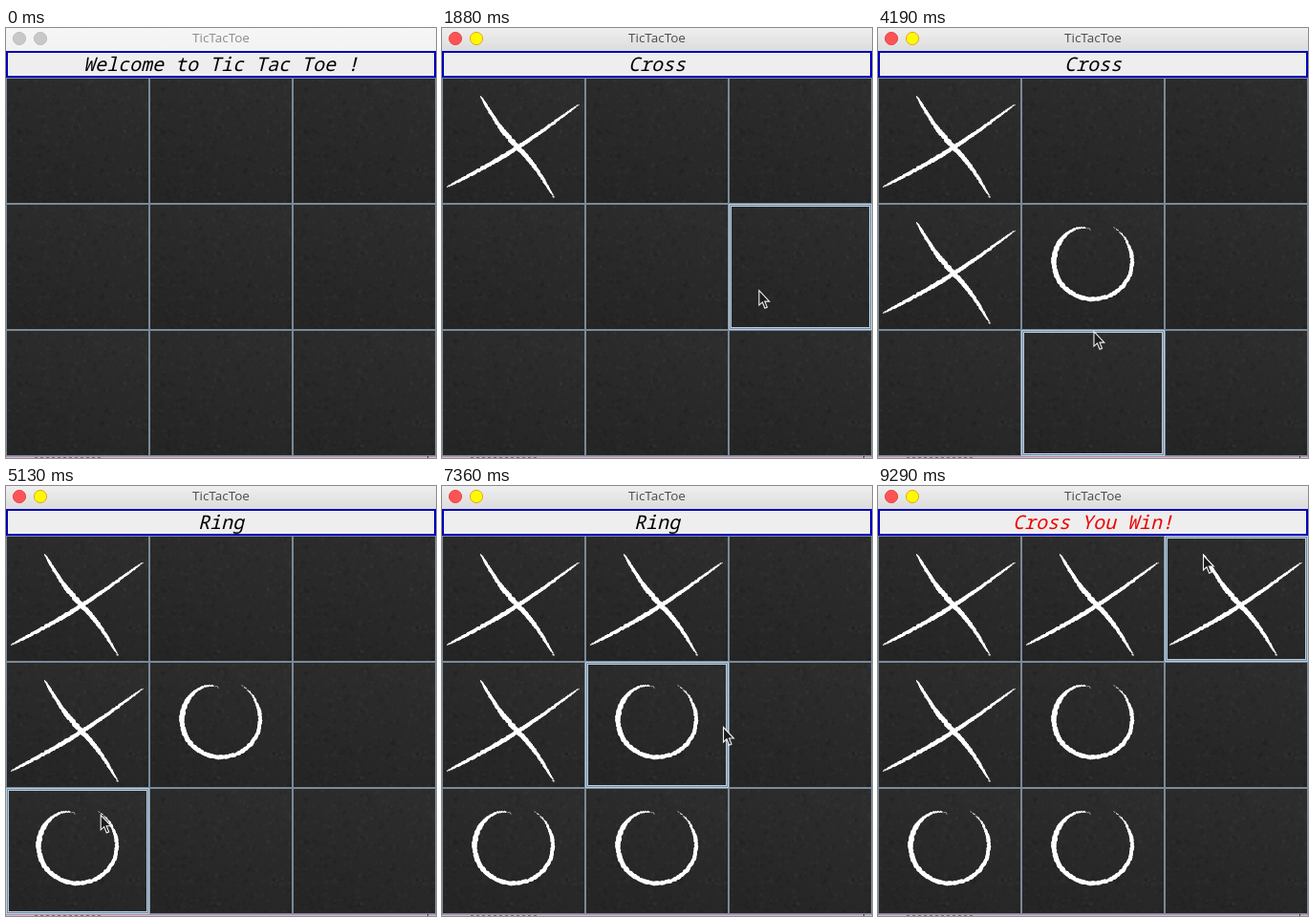
Write an HTML page with a canvas that moves like this. It is 450 px wide and 450 px high and loops after 9320 ms.

```html
<!DOCTYPE html>
<html lang="en">
<head>
<meta charset="utf-8">
<title>TicTacToe</title>
<style>
html, body { margin: 0; width: 100%; height: 100%; overflow: hidden; background: #eee; }
canvas { display: block; }
</style>
</head>
<body>
<canvas id="stage" width="450" height="450"></canvas>
<script>
const LOOP = 9320, CW = 150, CH = 132, TOP = 52, TICK = 42;
const STEEL = '#7a8a99', GLOW = '#b8cfe5';
const g = document.getElementById('stage').getContext('2d');

// Pointer trips: each runs on from where the last one ended, bowed sideways by `bend`
const START = { x: 446, y: 232 };
const trip = (from, to, x, y, bend = 0) => ({ from, to, x, y, bend });
const TRIPS = [
  trip(350, 790, 109, 113),
  trip(1350, 1800, 340, 250, -40),
  trip(1800, 2250, 222, 262, -80),
  trip(2300, 2570, 136, 296),
  trip(2570, 2850, 92, 256),
  trip(3400, 3880, 228, 365),
  trip(4060, 4310, 223, 270),
  trip(4350, 4840, 82, 372),
  trip(5080, 5460, 233, 117),
  trip(5770, 5850, 230, 102),
  trip(6130, 6290, 339, 211),
  trip(6500, 6940, 230, 382, -30),
  trip(7220, 7360, 294, 252),
  trip(7360, 7640, 372, 118),
  trip(7900, 8070, 362, 207),
  trip(8070, 8230, 380, 284),
  trip(9000, 9290, 340, 72)
];

// Turns alternate, cross first
const turn = (press, release, col, row) => ({ press, release, col, row });
const TURNS = [
  turn(1090, 1130, 0, 0), turn(2250, 2300, 1, 1), turn(3220, 3380, 0, 1),
  turn(4980, 5030, 0, 2), turn(6080, 6120, 1, 0), turn(7160, 7200, 1, 2),
  turn(7780, 7840, 2, 0)
];

function seeded(s) {
  return () => (s = (s * 16807) % 2147483647) / 2147483647;
}

function layer(paint) {
  const c = document.createElement('canvas');
  c.width = CW;
  c.height = CH;
  paint(c.getContext('2d'));
  return c;
}

const slate = layer(c => {
  const rnd = seeded(77);
  const grad = c.createLinearGradient(100, 0, 50, CH);
  grad.addColorStop(0, '#2d2d2d');
  grad.addColorStop(1, '#252525');
  c.fillStyle = grad;
  c.fillRect(0, 0, CW, CH);
  for (let i = 0; i < 650; i++) {
    c.fillStyle = rnd() < 0.5 ? 'rgba(0,0,0,.06)' : 'rgba(255,255,255,.02)';
    c.beginPath();
    c.ellipse(rnd() * CW, rnd() * CH, 0.6 + rnd() * 2.4, 0.5 + rnd() * 2, rnd() * 3, 0, 7);
    c.fill();
  }
});

// Rough line of varying width; at(s) gives [x, y, width]
function chalk(c, at, seed) {
  const rnd = seeded(seed);
  c.fillStyle = '#fff';
  for (let i = 0; i <= 240; i++) {
    const [x, y, w] = at(i / 240);
    c.beginPath();
    c.arc(x + rnd() - 0.5, y + rnd() - 0.5, w / 2 * (0.7 + rnd() * 0.4), 0, 7);
    c.fill();
  }
}

// Straight line with a slight S or bow across it
function slash(c, x0, y0, x1, y1, bow, width, seed) {
  chalk(c, s => [
    x0 + (x1 - x0) * s,
    y0 + (y1 - y0) * s + bow(s),
    1.2 + width * Math.sin(Math.PI * s ** 0.85) ** 0.7
  ], seed);
}

const cross = layer(c => {
  slash(c, 6, 114, 143, 28, s => 5 * Math.sin(Math.PI * s), 3.1, 5);
  slash(c, 41, 20, 117, 125, s => 4 * Math.sin(2 * Math.PI * s), 3.5, 9);
});

const ring = layer(c => {
  chalk(c, s => {
    const a = (-94 - 326 * s) * Math.PI / 180;
    const start = Math.max(0, 1 - s / 0.1), end = Math.max(0, (s - 0.88) / 0.12);
    const k = 1 - 0.14 * start * start + 0.06 * end;
    const w = Math.min(0.8 + s * 24, 5.8 - 2.4 * s, 0.8 + (1 - s) * 20);
    return [75 + 41 * k * Math.cos(a), 60.6 + 39.2 * k * Math.sin(a), w];
  }, 21);
});

function pointerAt(t) {
  if (t < TRIPS[0].from) return null;
  let a = START;
  for (const b of TRIPS) {
    if (t < b.from) break;
    if (t < b.to) {
      const s = Math.floor((t - b.from) / TICK) * TICK / (b.to - b.from);
      const dx = b.x - a.x, dy = b.y - a.y;
      const side = b.bend * Math.sin(Math.PI * s) / Math.hypot(dx, dy);
      return { x: a.x + dx * s - dy * side, y: a.y + dy * s + dx * side };
    }
    a = b;
  }
  return a;
}

function label(text, y, font, color) {
  g.textAlign = 'center';
  g.font = font;
  g.fillStyle = color;
  g.fillText(text, 225, y);
}

function light(x, fill, edge) {
  g.beginPath();
  g.arc(x, 11, 6.6, 0, 7);
  g.fillStyle = fill;
  g.fill();
  g.strokeStyle = edge;
  g.lineWidth = 1;
  g.stroke();
}

function drawTitle(active) {
  const grad = g.createLinearGradient(0, 0, 0, 24);
  grad.addColorStop(0, active ? '#efefef' : '#f6f6f6');
  grad.addColorStop(1, active ? '#dcdcdc' : '#f2f2f2');
  g.fillStyle = grad;
  g.fillRect(0, 0, 450, 24);
  light(14, active ? '#fc5355' : '#c8c8c8', active ? '#e8484a' : '#bebebe');
  light(36, active ? '#fffa00' : '#c8c8c8', active ? '#e0a824' : '#bebebe');
  label('TicTacToe', 15, '500 13.5px "Open Sans", "Noto Sans", sans-serif', active ? '#4a4a4a' : '#8c8c8c');
}

function drawStatus(text, color) {
  g.fillStyle = '#0000b8';
  g.fillRect(0, 24, 450, 28);
  g.fillStyle = '#eee';
  g.fillRect(2, 26, 446, 24);
  label(text, 45, 'italic 20px "Noto Sans Mono", "DejaVu Sans Mono", monospace', color);
}

function frame(col, row, inset, color) {
  g.strokeStyle = color;
  g.lineWidth = 1;
  g.strokeRect(col * CW + inset + 0.5, TOP + row * CH + inset + 0.5, CW - 1 - 2 * inset, CH - 1 - 2 * inset);
}

function drawCell(col, row, mark, hover, pressed) {
  const x = col * CW, y = TOP + row * CH;
  g.drawImage(slate, x, y);
  if (mark) g.drawImage(mark, x, y);
  if (pressed) {
    frame(col, row, 0, STEEL);
    g.fillStyle = STEEL;
    g.fillRect(x, y, CW, 2);
    g.fillRect(x, y, 2, CH);
  } else if (hover) {
    [GLOW, STEEL, GLOW].forEach((color, inset) => frame(col, row, inset, color));
  } else {
    frame(col, row, 0, STEEL);
  }
}

function drawBottom() {
  g.fillStyle = '#b48fae';
  g.fillRect(0, 448, 450, 1);
  g.fillStyle = '#cdbccb';
  g.fillRect(0, 449, 450, 1);
  g.fillStyle = '#7d7060';
  for (let x = 30; x < 102; x += 6) g.fillRect(x, 449, 3, 1);
  g.fillStyle = '#333';
  g.fillRect(441, 448, 1, 2);
}

const ARROW = new Path2D('M.5 .5V16L4 12.8L6.6 19.2L9 18.2L6.5 12H11.3Z');

function drawPointer(p) {
  g.save();
  g.translate(p.x, p.y);
  g.fillStyle = '#1c1c1c';
  g.fill(ARROW);
  g.strokeStyle = '#f0f0f0';
  g.lineWidth = 1.1;
  g.stroke(ARROW);
  g.restore();
}

function statusAt(count) {
  if (count === TURNS.length) return 'Cross You Win!';
  if (!count) return 'Welcome to Tic Tac Toe !';
  return count % 2 ? 'Cross' : 'Ring';
}

function draw(t) {
  const active = t >= TURNS[0].press;
  const count = TURNS.filter(m => t >= m.release).length;
  const p = pointerAt(t);
  drawTitle(active);
  drawStatus(statusAt(count), count === TURNS.length ? '#f00000' : '#000');
  for (let i = 0; i < 9; i++) {
    const col = i % 3, row = Math.floor(i / 3);
    const n = TURNS.findIndex(m => m.col === col && m.row === row);
    const mark = n >= 0 && n < count && (n % 2 ? ring : cross);
    const hover = p && Math.floor(p.x / CW) === col && Math.floor((p.y - TOP) / CH) === row;
    drawCell(col, row, mark, hover, n === count && t >= TURNS[n].press);
  }
  drawBottom();
  if (p) drawPointer(p);
}

const begin = performance.now();
function tick() {
  draw((performance.now() - begin) % LOOP);
  requestAnimationFrame(tick);
}
tick();
</script>
</body>
</html>
```
